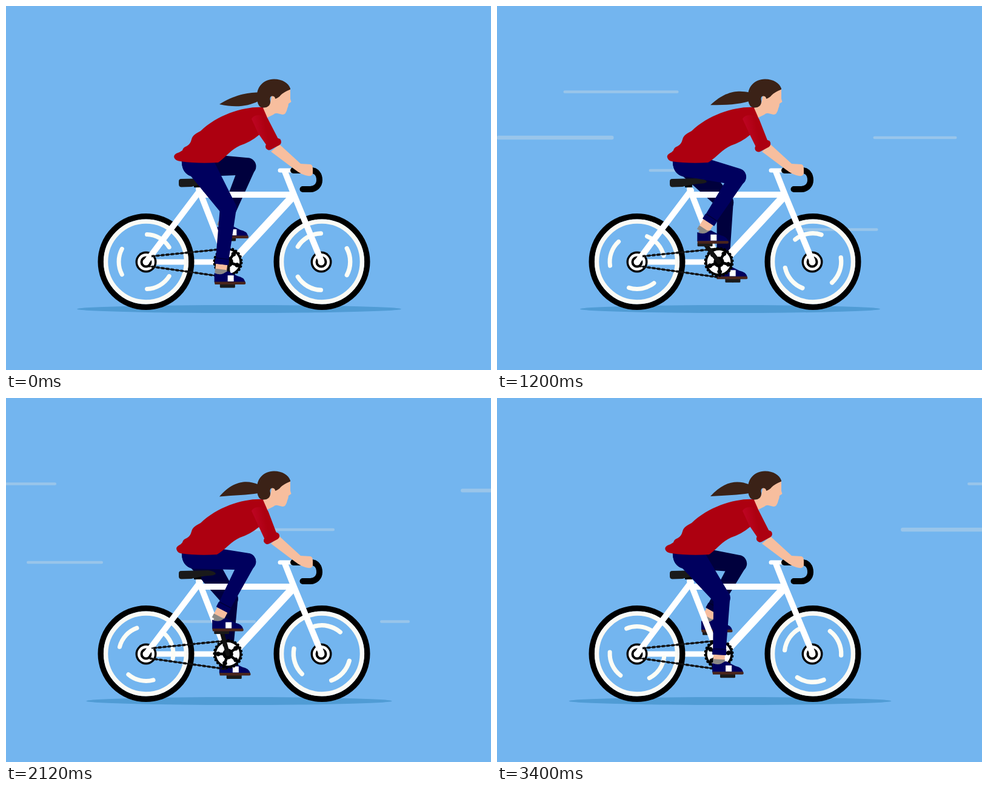
An HTML page that plays this animation: 800 by 600 pixels, repeating every 3440 ms.

```html
<!DOCTYPE html>
<html lang="en">
<head>
<meta charset="utf-8">
<title>Cyclist</title>
<style>
html, body { margin: 0; width: 100%; height: 100%; overflow: hidden; background: #73b5ef; }
svg { display: block; width: 100vw; height: 100vh; }
</style>
</head>
<body>
<svg viewBox="0 0 800 600" fill="none" stroke-linecap="round" stroke-linejoin="round">
  <defs>
    <linearGradient id="sleeveFill" gradientUnits="userSpaceOnUse" x1="407" y1="200" x2="428" y2="196">
      <stop offset="0" stop-color="#be0524"/>
      <stop offset="1" stop-color="#ad0010"/>
    </linearGradient>
    <g id="wheel">
      <circle r="74.7" stroke="#000" stroke-width="9.6"/>
      <circle r="66.4" stroke="#fafaf5" stroke-width="7.4"/>
    </g>
    <path id="arc" d="M-39.7,-21.1 A45,45 0 0 0 -39.7,21.1" stroke="#fdfdf6" stroke-width="7"/>
    <g id="arcs">
      <use href="#arc"/>
      <use href="#arc" transform="rotate(120)"/>
      <use href="#arc" transform="rotate(240)"/>
    </g>
    <g id="hub">
      <circle r="17.5" fill="#000"/>
      <circle r="14" fill="#fff"/>
      <circle r="7.5" stroke="#000" stroke-width="4"/>
    </g>
    <!-- right end of the sole is at 0,0 -->
    <g id="shoe">
      <path d="M-50,-16 L-49.500,-21 L-31,-22 L-30,-16 Z" fill="#8b8986"/>
      <path d="M-52,-19 Q-44,-15 -37,-18 L-32,-21 Q-29,-23 -26,-20 L-14,-14 Q-3,-12 -1,-4 H-52 Z" fill="#00005e"/>
      <path d="M-52,-4.5 H-1 Q1,0 -3,0 H-51 Z" fill="#4a251c"/>
      <rect x="-30" y="-15" width="10" height="10" fill="#fff"/>
    </g>
  </defs>

  <rect width="800" height="600" fill="#73b5ef"/>
  <ellipse id="shadow" cx="384.5" cy="499.5" ry="6.5" fill="#509cd5"/>
  <g id="wind" stroke="#99c5ea"></g>

  <path d="M231,422 H366" stroke="#fff" stroke-width="9"/>
  <use href="#wheel" x="231" y="421.5"/>
  <use href="#wheel" x="521" y="421.5"/>
  <use id="rearArcs" href="#arcs"/>
  <use id="frontArcs" href="#arcs"/>
  <use href="#hub" x="231" y="422"/>
  <use href="#hub" x="520" y="422"/>

  <g id="farLeg"></g>

  <g stroke="#fff" stroke-width="10">
    <path d="M231,422 L320,304 M318,302 L365,422 M322,311 H474"/>
    <path d="M473,314 L374,421" stroke-width="13"/>
    <path d="M460,273 L475,311 L520,420"/>
    <path d="M452,271 H470" stroke-width="7"/>
  </g>
  <path d="M310,296 H322" stroke="#000" stroke-width="6" stroke-linecap="butt"/>
  <path d="M289,285 L334,284 Q346,286 346,290 Q343,293 333,293 Q315,295 306,298 L289,298.5 Q285,298 285,294 V289 Q285,285 289,285 Z" fill="#1a1a1a"/>
  <path d="M474,271 H503 C512,271 517,278 517,287 C517,296 510,302 502,302 H489.500" stroke="#000" stroke-width="10"/>

  <g stroke="#111" stroke-linecap="butt">
    <path d="M240,412.500 L364,400 M364,447 L236,429" stroke-width="1.800"/>
    <path id="chain" d="M240,412.500 L364,400 M364,447 L236,429" stroke-width="3.600" stroke-dasharray="5 3"/>
  </g>
  <g id="ring">
    <circle r="23" fill="#000"/>
    <circle r="23.200" stroke="#000" stroke-width="2.500" stroke-dasharray="3.500 2.574" stroke-linecap="butt"/>
    <circle r="14" stroke="#fff" stroke-width="10.500"/>
    <g id="spider" stroke="#000" stroke-width="4.500"></g>
    <circle r="1.500" fill="#fff"/>
  </g>

  <g id="nearLeg"></g>

  <path id="shirt" fill="#ad0010"/>
  <path d="M437,240 L451,228 L486,260 L502,261 Q506,262 506,268 V276 Q505,281 498,280 Q487,278 477,270 Z" fill="#f7be9e"/>
  <path id="sleeve" fill="url(#sleeveFill)"/>
  <path id="cuff" stroke="#ad0010" stroke-width="12"/>

  <path id="tail" fill="#3b2217"/>
  <path d="M440,140 L469,137 V153 L470.500,158 L466,161 Q466,164 464,169 Q462,179 456,179 L448,177 Q444,176 441,179 L431,184 L424,168 L436,160 Z" fill="#f7be9e"/>
  <path d="M469,136 C466,127 456,120.5 442,120.5 C424,121 413,134 414,150 C414,158 416,165 421,167 Q429,169 434,164 Q437,160 435.500,154 Q435,148 440,148.500 Q444,149 444,153 Q450,151 453,147 Q458,142 469,137.500 Z" fill="#3b2217"/>
</svg>

<script>
const STEP = 40, STEPS = 86;
const TURN = 16.65;             // degrees per step, wheels and cranks alike
const WIND_SPEED = 94, WIND_CYCLE = 20.697;
const HIP = [312, 266], THIGH = 86.5, SHIN = 102.5;
const PELVIS = [315, 262];
const AXLE = [366, 422];

const $ = id => document.getElementById(id);
const rad = deg => deg * Math.PI / 180;

function add(parent, tag, attrs) {
  const el = document.createElementNS("http://www.w3.org/2000/svg", tag);
  set(el, attrs);
  return parent.appendChild(el);
}
function set(el, attrs) {
  for (const key in attrs) el.setAttribute(key, attrs[key]);
}

// start x, y, length, thickness
const wind = [
  [984, 141.5, 190, 4.5], [1841, 152.5, 194, 6], [874, 217, 193, 6.5],
  [1495, 217, 138, 4.5], [1125, 271, 126, 4.5], [1366, 368.5, 137, 4.5],
  [1708, 368.5, 49, 4.5]
].map(([x, y, len, w]) => ({
  x, y, len, w, el: add($("wind"), "path", { "stroke-width": w })
}));

for (let i = 0; i < 5; i++) {
  const a = rad(i * 72 + 18), c = Math.cos(a), s = Math.sin(a);
  add($("spider"), "path", { d: `M0,0 L${18 * c},${18 * s}` });
  add($("spider"), "circle", { cx: 16 * c, cy: 16 * s, r: 1.5 });
}

function makeLeg(id, cloth, seam) {
  const g = $(id), flat = { "stroke-linecap": "butt" };
  return {
    crank: add(g, "path", { stroke: "#111", "stroke-width": 7 }),
    pedal: add(g, "rect", { width: 25, height: 7, rx: 1.5, fill: "#1a1a1a" }),
    skin: add(g, "path", { stroke: "#f7be9e", "stroke-width": 19, ...flat }),
    sock: add(g, "path", { stroke: "#8b8986", "stroke-width": 19.5, ...flat }),
    shoe: add(g, "use", { href: "#shoe" }),
    shin: add(g, "path", { fill: cloth }),
    thigh: add(g, "path", { fill: cloth }),
    cuff: add(g, "path", { stroke: cloth, "stroke-width": 9, ...flat }),
    seam: add(g, "path", { stroke: seam, "stroke-width": 1.5 })
  };
}
const farLeg = makeLeg("farLeg", "#00003d", "#00002a");
const nearLeg = makeLeg("nearLeg", "#00005e", "#000038");

// Tapered limb from a to b, round at a, round or flat at b
function limb(a, ra, b, rb, flat) {
  const dx = b[0] - a[0], dy = b[1] - a[1], d = Math.hypot(dx, dy);
  const nx = dy / d, ny = -dx / d;
  const at = (p, r) => `${p[0] + nx * r},${p[1] + ny * r}`;
  const end = flat ? "L" : `A${rb},${rb} 0 0 1 `;
  return `M${at(a, ra)} L${at(b, rb)} ${end}${at(b, -rb)} L${at(a, -ra)} A${ra},${ra} 0 0 1 ${at(a, ra)} Z`;
}

function kneeOf(ankle) {
  const dx = ankle[0] - HIP[0], dy = ankle[1] - HIP[1], d = Math.hypot(dx, dy);
  const along = (THIGH ** 2 - SHIN ** 2 + d * d) / (2 * d);
  const out = Math.sqrt(Math.max(0, THIGH ** 2 - along ** 2));
  return [HIP[0] + (dx * along + dy * out) / d, HIP[1] + (dy * along - dx * out) / d];
}

function poseLeg(leg, deg) {
  const c = Math.cos(rad(deg)), s = Math.sin(rad(deg));
  const pedal = [AXLE[0] + 36 * c, AXLE[1] + 38.5 * s];
  const toe = [398 + 27 * Math.cos(rad(deg + 4)), 421 + 38 * s];
  const ankle = [toe[0] - 41, toe[1] - 24];
  const knee = kneeOf(ankle);
  const ux = (ankle[0] - knee[0]) / SHIN, uy = (ankle[1] - knee[1]) / SHIN;
  const bare = 8 + 10 * Math.max(0, -ux);
  const up = d => [ankle[0] - ux * d, ankle[1] - uy * d];
  const across = (p, w) => `M${p[0] + uy * w},${p[1] - ux * w} L${p[0] - uy * w},${p[1] + ux * w}`;

  set(leg.crank, { d: `M${AXLE} L${pedal}` });
  set(leg.pedal, { x: pedal[0] - 12.5, y: pedal[1] - 3 });
  set(leg.shoe, { x: toe[0], y: toe[1] });
  set(leg.skin, { d: `M${up(bare + 2)} L${up(0)}` });
  set(leg.sock, { d: `M${up(1)} L${up(-6)}` });
  set(leg.shin, { d: limb(knee, 13.5, up(bare), 10.5, true) });

  const tx = (knee[0] - HIP[0]) / THIGH, ty = (knee[1] - HIP[1]) / THIGH;
  const top = [knee[0] + ty * 14, knee[1] - tx * 14];
  const seat = "M290,252 C289,267 294,280 312,282 L335,252 Z";
  const front = `M342,254 L${top} L${knee} L${PELVIS} L310,252 Z`;
  set(leg.thigh, { d: limb(PELVIS, 19.5, knee, 14) + front });
  set(leg.shin, { d: limb(knee, 13.5, up(bare), 10.5, true) + seat });
  set(leg.cuff, { d: across(up(bare + 4.5), 11.5) });
  set(leg.seam, { d: across(up(bare + 9.5), 10) });
}

function poseRider(deg, n) {
  const k = (1 - Math.sin(rad(deg))) / 2, h = 4 * k;
  set($("shirt"), {
    d: `M424,167 C395,165 350,178 321,206 C312,211 308,213 306,220 Q304,228 298,231
      Q292,233 291,238 Q${287 + h / 2},241 ${281 + h},243 Q${276 + h},246 ${277.5 + h},250
      Q${279 + h},255 288,256 Q315,260 ${350 - h / 2},258 C362,250 370,237 386,230
      Q404,224 418,212 L431,184 Q430,172 424,167 Z`
  });
  const x = -3 * k, y = 3.5 * k;
  set($("sleeve"), {
    d: `M405,186 Q411,176 428,182 Q431,183 433,188 L${449 + x},${219 + y} L${430 + x},${230 + y} L416,210 Z`
  });
  set($("cuff"), { d: `M${434 + x},${231.5 + y} L${448 + x},${224 + y}` });

  const wave = rad(20 + 44 * n), b = Math.cos(wave), tip = 162.3 - Math.sin(wave);
  set($("tail"), {
    d: `M416,142.500 C398,${139 + 4 * b} 376,${141 + 6 * b} 352,${tip}
      C378,${164 + 4 * b} 398,${163 + 3 * b} 416,157 Z`
  });
}

function draw(n) {
  const spin = TURN * n, deg = 91 + spin;

  const fromPeak = Math.abs((n + 21.5) % 43 - 21.5);
  set($("shadow"), { rx: 267.5 - 1.53 * fromPeak });

  const travel = WIND_SPEED * (n % WIND_CYCLE);
  for (const { x, y, len, w, el } of wind) {
    const left = x - travel;
    set(el, { d: `M${left + w / 2},${y} H${left + len - w / 2}` });
  }

  set($("rearArcs"), { transform: `translate(231 421.5) rotate(${spin})` });
  set($("frontArcs"), { transform: `translate(521 421.5) rotate(${spin + 60}) scale(1.04)` });
  set($("ring"), { transform: `translate(${AXLE}) rotate(${spin})` });
  set($("chain"), { "stroke-dashoffset": -6.4 * n });

  poseLeg(farLeg, deg + 180);
  poseLeg(nearLeg, deg);
  poseRider(deg, n);
}

const start = performance.now();
function tick() {
  const t = Math.max(0, performance.now() - start);
  draw(Math.floor(t / STEP + 0.05) % STEPS);
  requestAnimationFrame(tick);
}
tick();
</script>
</body>
</html>
```
